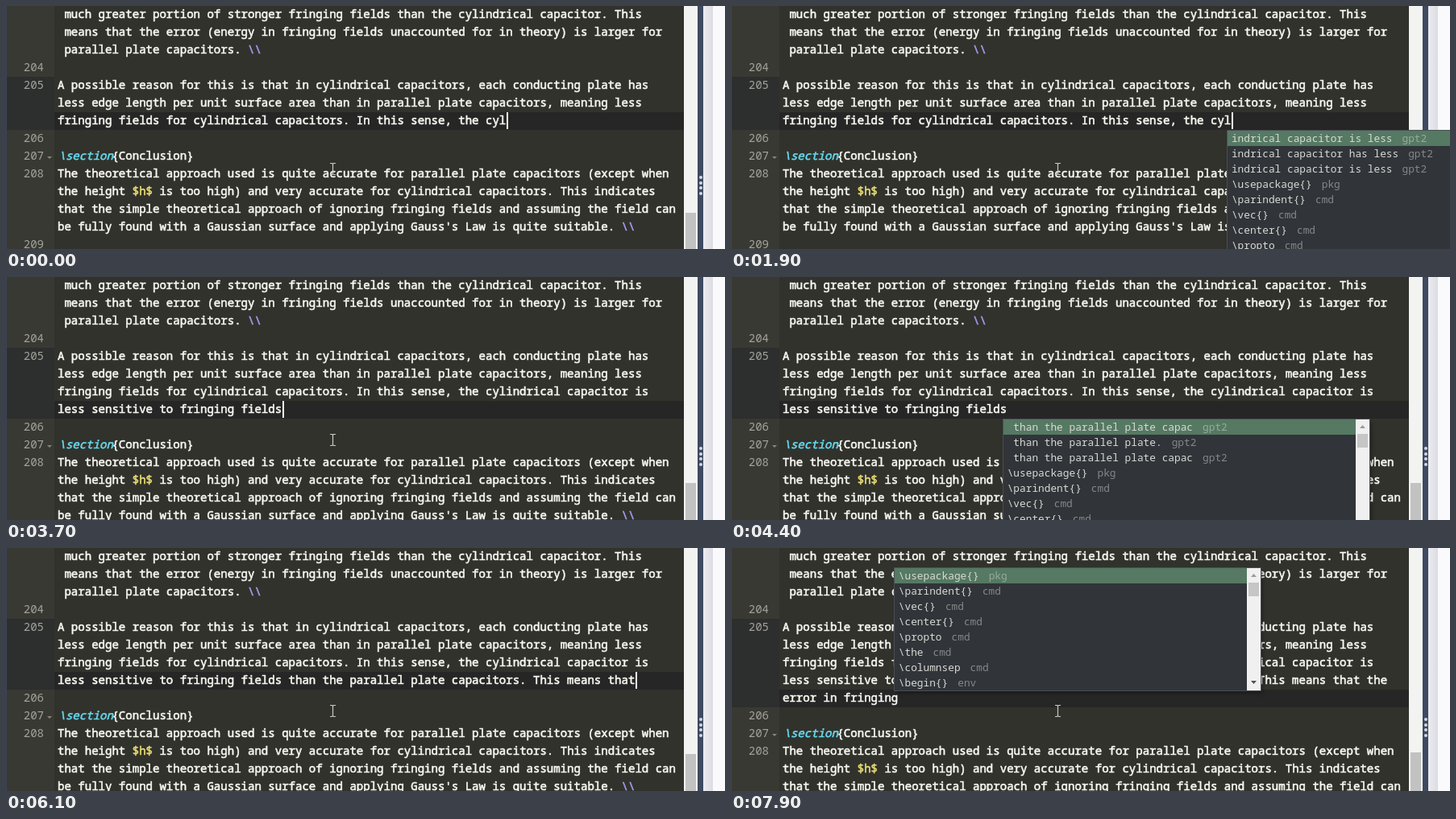
An HTML page that plays this animation: 892x302 px, repeating every 8000 ms.

```html
<!DOCTYPE html>
<html lang="en">
<head>
<meta charset="utf-8">
<title>Editor completion</title>
<style>
  html, body { margin: 0; width: 100%; height: 100%; overflow: hidden; background: #31322c; }
  #stage { position: relative; width: 892px; height: 302px; overflow: hidden; background: #31322c; }
  #stage div, #stage svg { position: absolute; }
  #gutter { left: 0; top: 0; width: 60px; height: 302px; background: #383932; border-left: 1px solid #3b4358; box-sizing: border-box; }
  .row, .num { font: 400 14.05px/22px "Noto Sans Mono", "DejaVu Sans Mono", monospace; white-space: pre; height: 22px; }
  .row { left: 64px; color: #f8f8f2; -webkit-text-stroke: .6px currentColor; }
  .num { left: 0; width: 47px; text-align: right; color: #a2a39b; }
  .fold { left: 51px; width: 0; height: 0; border: 3px solid transparent; border-top-color: #85867e; border-bottom: 0; }
  .cmd { position: relative; left: 1.5px; color: #66d9ef; font-style: italic; }
  .math { color: #e6db74; }
  .esc { color: #a39af0; }
  #activeGutter { left: 1px; top: 88px; width: 59px; background: #2d2e2e; }
  #activeLine { left: 60px; width: 781px; height: 22px; background: #262626; }
  #caret { width: 2px; height: 21px; background: #f8f8f0; }
  #bar { left: 841px; top: 0; width: 17px; height: 302px; background: #f3f3f2; }
  #thumb { left: 843px; width: 13px; height: 60px; background: #c2c2c2; }
  #split { left: 858px; top: 0; width: 7px; height: 302px; background: #3e4a60; }
  #split div { left: 1.5px; width: 4px; height: 4px; border-radius: 50%; background: #d3d9e3; }
  #pane { left: 865px; top: 0; width: 27px; height: 302px; background: linear-gradient(90deg, #ebebf0, #dcdce3 12px, #fafafc 12px); }
  #popup { width: 454px; height: 152px; overflow: hidden; background: #313439; box-shadow: 0 0 0 1px #4b4f54, 2px 3px 5px #0006; }
  #items { left: 0; top: 0; }
  .item { left: 0; width: 437px; height: 19px; padding-left: 5px; box-sizing: border-box; white-space: pre;
    font: 400 12.8px/19px "Noto Sans Mono", "DejaVu Sans Mono", monospace; color: #d9dad5; }
  .item:first-child { background: #557963; }
  .item span { margin-left: 12px; opacity: .5; }
  #track { right: 0; top: 0; width: 17px; height: 152px; background: #f0f0f0; }
  #track div { left: 2px; top: 18px; width: 13px; height: 17px; background: #c6c6c6; }
  #track svg { left: 0; top: 0; }
</style>
</head>
<body>
<div id="stage">
  <div id="gutter"></div>
  <div id="activeGutter"></div>
  <div id="activeLine"></div>
  <div id="rows"></div>
  <div id="caret"></div>
  <svg style="left:400px;top:194px" width="11" height="17" fill="none" stroke="#c9c9c3" stroke-width="1.2">
    <path d="M2 1.5H4.5L5.5 2.5 6.5 1.5H9M5.5 2.5V14.5M2 15.5H4.5L5.5 14.5 6.5 15.5H9"/>
  </svg>
  <div id="bar"></div>
  <div id="thumb"></div>
  <div id="split"></div>
  <div id="pane"></div>
  <div id="popup">
    <div id="items"></div>
    <div id="track">
      <div></div>
      <svg width="17" height="152"><path d="M5 11L8.5 7 12 11Z" fill="#9a9a9a"/><path d="M5 140L8.5 144 12 140Z" fill="#505050"/></svg>
    </div>
  </div>
</div>
<script>
const $ = id => document.getElementById(id);
const LOOP = 8000, ROW = 22, CHAR = 8.43, LEFT = 64, WRAP = 91, FIRST_ROW = 4;

const span = (cls, text) => `<span class="${cls}">${text}</span>`;
const before = [
  ["", " much greater portion of stronger fringing fields than the cylindrical capacitor. This"],
  ["", " means that the error (energy in fringing fields unaccounted for in theory) is larger for"],
  ["", " parallel plate capacitors. " + span("esc", "\\\\")],
  [204, ""]
];
const after = [
  [206, ""],
  [207, span("cmd", "\\section") + "{Conclusion}"],
  [208, "The theoretical approach used is quite accurate for parallel plate capacitors (except when"],
  ["", `the height ${span("math", "$h$")} is too high) and very accurate for cylindrical capacitors. This indicates`],
  ["", "that the simple theoretical approach of ignoring fringing fields and assuming the field can"],
  ["", "be fully found with a Gaussian surface and applying Gauss's Law is quite suitable. " + span("esc", "\\\\")],
  [209, ""]
];
const opening = "A possible reason for this is that in cylindrical capacitors, each conducting plate has " +
  "less edge length per unit surface area than in parallel plate capacitors, meaning less " +
  "fringing fields for cylindrical capacitors. In this sense, the cyl";

const commands = [["\\usepackage{}", "pkg"], ["\\parindent{}", "cmd"], ["\\vec{}", "cmd"], ["\\center{}", "cmd"],
  ["\\propto", "cmd"], ["\\the", "cmd"], ["\\columnsep", "cmd"], ["\\begin{}", "env"]];

// Each round: popup opens, predictions arrive, the first one is accepted.
const rounds = [
  { open: 500, ready: 1300, accept: 2100,
    options: ["indrical capacitor is less", "indrical capacitor has less", "indrical capacitor is less"] },
  { open: 2900, ready: 3200, accept: 3600,
    options: [" sensitive to fringing fields", " sensitive to the fringing", " sensitive to fringing fields"] },
  { open: 3900, ready: 4300, accept: 4700,
    options: [" than the parallel plate capac", " than the parallel plate.", " than the parallel plate capac"] },
  { open: 5000, ready: 5500, accept: 6000,
    options: ["itors. This means that", "itor. This means that", "itors. This is because"] },
  { open: 6600, ready: 7000, accept: 7300,
    options: [" the error in fringing", " the fringing fields", " the error in the"] },
  { open: 7700, ready: Infinity, accept: Infinity, options: [] }
];

function wrap(text) {
  const lines = [""];
  for (const word of text.split(" ")) {
    const last = lines[lines.length - 1];
    if (!last) lines[lines.length - 1] = word;
    else if (last.length + 1 + word.length > WRAP) lines.push(word);
    else lines[lines.length - 1] = last + " " + word;
  }
  return lines;
}

function drawText(lines) {
  const all = [...before, ...lines.map((line, i) => [i ? "" : 205, line]), ...after];
  $("rows").innerHTML = all.map(([num, text], i) => {
    const top = `style="top:${i * ROW - 1}px"`;
    const fold = num === 207 ? `<div class="fold" style="top:${i * ROW + 11}px"></div>` : "";
    return `<div class="num" ${top}>${num}</div>${fold}<div class="row" ${top}>${text}</div>`;
  }).join("");
}

function drawPopup(round, ready, caretX, lineTop) {
  $("popup").style.display = round ? "block" : "none";
  if (!round) return;
  const below = lineTop + ROW < 190;
  $("popup").style.left = caretX - 4.5 + "px";
  $("popup").style.top = (below ? lineTop + ROW + 1 : lineTop - 151) + "px";
  const predicted = ready ? round.options.map(text => [text, "gpt2"]) : [];
  $("items").innerHTML = [...predicted, ...commands].slice(0, 8).map(([text, kind], i) =>
    `<div class="item" style="top:${i * 19}px">${text}<span>${kind}</span></div>`).join("");
}

let shown = "";
function render(t) {
  const done = rounds.filter(r => t >= r.accept);
  const round = rounds.find(r => t >= r.open && t < r.accept);
  const ready = !!round && t >= round.ready;
  const key = [done.length, !!round, ready].join();
  if (key !== shown) {
    shown = key;
    const lines = wrap(opening + done.map(r => r.options[0]).join(""));
    const lineTop = (FIRST_ROW + lines.length - 1) * ROW;
    const caretX = LEFT + lines[lines.length - 1].length * CHAR;
    drawText(lines);
    drawPopup(round, ready, caretX, lineTop);
    $("activeGutter").style.height = lines.length * ROW + "px";
    $("activeLine").style.top = lineTop + "px";
    $("caret").style.left = caretX + 0.6 + "px";
    $("caret").style.top = lineTop + "px";
    $("thumb").style.top = 257 - (lines.length - 3) * 1.5 + "px";
  }
  const since = t - (done.length ? done[done.length - 1].accept : -300);
  $("caret").style.visibility = since % 1000 < 500 ? "visible" : "hidden";
}

for (let i = 0; i < 4; i++) {
  const dot = document.createElement("div");
  dot.style.top = 211 + i * 6.5 + "px";
  $("split").append(dot);
}

const start = performance.now();
function tick() {
  render((performance.now() - start) % LOOP);
  requestAnimationFrame(tick);
}
tick();
</script>
</body>
</html>
```
